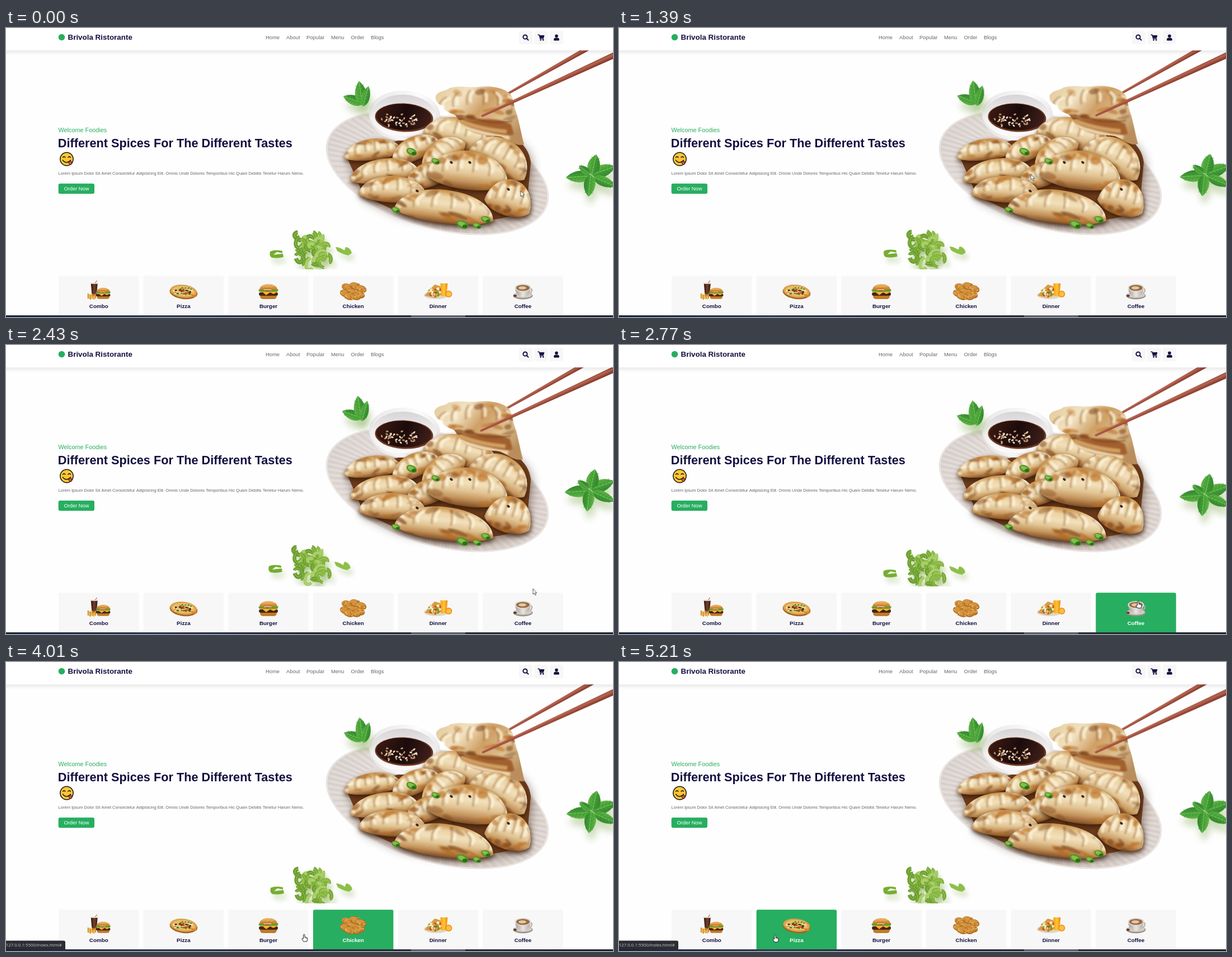
These frames come from a looping animation (1085 px wide and 516 px high, 5.28 s). An HTML page with a canvas:

```html
<!DOCTYPE html>
<html lang="en">
<head>
<meta charset="utf-8">
<title>Restaurant landing page</title>
<style>
  html, body { margin: 0; width: 100%; height: 100%; overflow: hidden; background: #fff; }
  canvas { display: block; }
</style>
</head>
<body>
<canvas id="stage" width="1085" height="516"></canvas>
<script>
const W = 1085, H = 516, PAD = 20, LOOP = 5280;
const NAVY = '#130f40', GREEN = '#27ae60', GREY = '#666', PANEL = '#f7f7f7';
const SANS = '"Liberation Sans", Arial, sans-serif';
const ctx = document.getElementById('stage').getContext('2d');

// ---------- helpers ----------
const clamp = v => Math.max(0, Math.min(1, v));
function randomizer(seed) {
  return () => (seed = (seed * 16807) % 2147483647) / 2147483647;
}
function layer(paint) {
  const c = document.createElement('canvas');
  c.width = W + 2 * PAD;
  c.height = H + 2 * PAD;
  const g = c.getContext('2d');
  g.translate(PAD, PAD);
  paint(g);
  return c;
}
function ellipse(g, x, y, rx, ry, fill, rot = 0) {
  g.beginPath();
  g.ellipse(x, y, rx, ry, rot, 0, 7);
  g.fillStyle = fill;
  g.fill();
}
function box(g, x, y, w, h, r, fill) {
  g.beginPath();
  g.roundRect(x, y, w, h, r);
  g.fillStyle = fill;
  g.fill();
}
function shape(g, d, fill, stroke, width = 1) {
  const p = new Path2D(d);
  if (fill) { g.fillStyle = fill; g.fill(p); }
  if (stroke) { g.strokeStyle = stroke; g.lineWidth = width; g.stroke(p); }
}
function text(g, s, x, y, font, fill, align = 'left') {
  g.font = font + ' ' + SANS;
  g.textAlign = align;
  g.fillStyle = fill;
  g.fillText(s, x, y);
}
function gradient(g, x0, y0, x1, y1, colors) {
  const gr = g.createLinearGradient(x0, y0, x1, y1);
  colors.forEach((c, i) => gr.addColorStop(i / (colors.length - 1), c));
  return gr;
}
function shadowed(g, color, blur, dx, dy, paint) {
  g.save();
  g.shadowColor = color;
  g.shadowBlur = blur;
  g.shadowOffsetX = dx;
  g.shadowOffsetY = dy;
  paint();
  g.restore();
}
function mix(a, b, k) {
  return 'rgb(' + a.map((v, i) => Math.round(v + (b[i] - v) * k)) + ')';
}

// ---------- food ----------
const DOUGH = ['#c58b45', '#ecd2a2', '#f1e0bd', '#e2c594', '#c3925a', '#7d4a22'];

// Soft folds and browned spots, kept inside the given outline.
function toast(g, outline, w, h, seed) {
  const rnd = randomizer(seed * 7919 + 11);
  g.save();
  g.clip(outline);
  g.filter = 'blur(1.6px)';
  g.lineCap = 'round';
  for (let x = -.4; x < .44; x += .15) {
    const top = -h * .4 + x * x * h * 1.4, lean = x * w * .35 + rnd() * 8 - 4;
    shape(g, `M${x * w} ${top}q${lean} ${h * .15} ${lean * .7} ${h * .42}`, null, 'rgba(136,80,32,.4)', 3);
    shape(g, `M${x * w + 6} ${top + 2}q${lean} ${h * .12} ${lean * .6} ${h * .3}`, null, 'rgba(255,246,222,.7)', 5);
  }
  for (let i = 0; i < 16; i++) {
    const x = (rnd() - .5) * w, low = rnd() > .45;
    const y = low ? h * (.2 + rnd() * .28) : -h * .42 + x * x / (w * w) * h * 1.8 + rnd() * h * .12;
    const tone = rnd() > .35 ? '186,108,30' : '118,58,14';
    ellipse(g, x, y, w * (.04 + rnd() * .07), h * (.04 + rnd() * .06), `rgba(${tone},${.3 + rnd() * .35})`, rnd() - .5);
  }
  g.restore();
}
function dumpling(g, x, y, w, h, rot, seed) {
  const a = w / 2, b = h / 2;
  const outline = new Path2D(`M${-a} ${b * .5}C${-a} ${-b * .2} ${-a * .6} ${-b} 0 ${-b}` +
    `C${a * .7} ${-b} ${a} ${-b * .1} ${a} ${b * .5}C${a * .6} ${b * 1.15} ${-a * .6} ${b * 1.15} ${-a} ${b * .5}Z`);
  g.save();
  g.translate(x, y);
  g.rotate(rot);
  shadowed(g, 'rgba(52,24,6,.85)', 9, 1, 4, () => {
    g.fillStyle = gradient(g, 0, -b, 0, b, DOUGH);
    g.fill(outline);
  });
  toast(g, outline, w, h, seed);
  g.restore();
}
function scallion(g, x, y, size) {
  ellipse(g, x, y, size, size * .62, '#4f9626', .4);
  ellipse(g, x - 1, y - 1, size * .65, size * .35, '#86bd4c', .4);
  ellipse(g, x + size * .4, y + size * .3, size * .4, size * .3, '#2f6d17');
}
function bowl(g) {
  const rnd = randomizer(29);
  shape(g, 'M649 156C652 184 678 201 708 201C748 201 774 181 776 157Z', gradient(g, 649, 0, 776, 0, ['#e6e2e2', '#fbfafa', '#c9c0bf']));
  ellipse(g, 712.5, 154, 63.5, 42, gradient(g, 660, 115, 760, 195, ['#e9e7e9', '#fcfcfd', '#e6e1e1']), .06);
  ellipse(g, 712, 156, 57, 37, gradient(g, 0, 118, 0, 193, ['#d6d3d6', '#f1efef', '#fcfbfa']), .06);
  ellipse(g, 711.5, 160, 52, 25.5, '#6c3a22', .05);
  ellipse(g, 711, 159, 49.5, 23.5, gradient(g, 665, 140, 755, 180, ['#3c1a12', '#1b0b0b', '#41201a']), .05);
  for (let i = 0; i < 38; i++) {
    const a = rnd() * 6.28, r = Math.sqrt(rnd());
    ellipse(g, 703 + Math.cos(a) * r * 34, 164 + Math.sin(a) * r * 13, 2.5, 1.5, rnd() > .4 ? '#ead9c2' : '#b78f69', rnd() * 3);
  }
}
function plate(g) {
  const cx = 771, cy = 258, tilt = .28;
  ellipse(g, cx, cy, 205, 100, gradient(g, 600, 160, 900, 370, ['#d9d2ce', '#e9e2de', '#cfc4be', '#ddd4cf']), tilt);
  g.save();
  g.translate(cx, cy);
  g.rotate(tilt);
  g.lineWidth = 1;
  for (let i = 0; i < 130; i++) {
    const a = i * Math.PI / 65;
    g.beginPath();
    g.moveTo(Math.cos(a) * 150, Math.sin(a) * 70);
    g.lineTo(Math.cos(a) * 201, Math.sin(a) * 97);
    g.strokeStyle = i % 2 ? 'rgba(255,255,255,.4)' : 'rgba(150,132,126,.2)';
    g.stroke();
  }
  g.beginPath();
  g.ellipse(0, 0, 203.5, 98.5, 0, 0, 7);
  g.strokeStyle = '#ece7e4';
  g.lineWidth = 2;
  g.stroke();
  g.restore();

  shadowed(g, 'rgba(80,55,40,.6)', 18, 2, 6, () =>
    shape(g, 'M610 232C650 202 720 210 760 172L870 165C900 190 935 205 938 240L930 325C880 350 800 352 700 328L640 300Z', '#6b3b1b'));
  bowl(g);
  const pile = [
    [815, 190, 136, 58, .25], [655, 217, 104, 38, -.12], [885, 230, 112, 66, .5],
    [730, 215, 92, 42, -.42], [778, 230, 96, 56, -.8], [676, 255, 124, 44, -.12],
    [755, 262, 90, 44, -.35], [826, 254, 146, 70, .12], [692, 288, 122, 48, .05],
    [900, 303, 84, 66, .3], [784, 319, 178, 60, .12]
  ];
  pile.forEach((p, i) => dumpling(g, ...p, i + 1));
  [[725, 221, 10], [768, 238, 8], [697, 325, 8], [816, 351, 11], [842, 353, 8], [858, 342, 9]].forEach(s => scallion(g, ...s));
  [[829, 240], [796, 240], [800, 287], [735, 291], [898, 288]].forEach(([x, y]) => ellipse(g, x, y, 3, 2, '#3d2411', .6));
}

// ---------- floating garnish ----------
function leaf(g, x0, y0, x1, y1, width) {
  const len = Math.hypot(x1 - x0, y1 - y0);
  g.save();
  g.translate(x0, y0);
  g.rotate(Math.atan2(y1 - y0, x1 - x0));
  shape(g, `M0 0C${len * .2} ${-width} ${len * .7} ${-width * .8} ${len} 0C${len * .7} ${width * .8} ${len * .2} ${width} 0 0Z`,
    gradient(g, 0, -width, 0, width, ['#6dbd4c', '#46a238', '#2a7d29']));
  shape(g, `M0 0L${len} 0`, null, '#92cf70', .8);
  for (let i = 1; i < 6; i++) {
    const x = len * i / 7;
    shape(g, `M${x + 5} ${-width * .5}L${x} 0L${x + 5} ${width * .5}`, null, 'rgba(28,96,30,.4)', .7);
  }
  g.restore();
}
function leaves(g) {
  const clusters = [
    [[639, 135, 603, 122, 13], [637, 137, 631, 95, 15], [638, 140, 648, 104, 11]],
    [[1047, 262, 1089, 247, 16], [1047, 262, 1055, 226, 16], [1046, 264, 1001, 267, 15],
     [1050, 266, 1090, 283, 13], [1045, 262, 1041, 301, 15], [1044, 261, 1024, 246, 9]]
  ];
  for (const cluster of clusters) {
    shadowed(g, 'rgba(130,170,80,.36)', 13, 3, 14, () => cluster.forEach(l => leaf(g, ...l)));
    cluster.forEach(l => leaf(g, ...l));
  }
}
function slices(g) {
  const rnd = randomizer(73);
  const tones = ['#6b9e2c', '#86b63e', '#a3cb62', '#77ab33'];
  const curl = (x, y, r, from, span, width, tone) => {
    g.lineWidth = width;
    g.beginPath();
    g.ellipse(x, y, r, r * .65, from * .4, from, from + span);
    g.strokeStyle = tone;
    g.stroke();
    g.lineWidth = 1;
    g.strokeStyle = 'rgba(214,234,164,.5)';
    g.stroke();
  };
  shadowed(g, 'rgba(140,175,85,.3)', 9, 5, 10, () => {
    g.lineCap = 'butt';
    for (let i = 0; i < 40; i++) {
      const v = i / 40, y = 372 + v * 51;
      const x = 541 + v * 11 + (rnd() - .5) * (32 + v * 36);
      curl(x, y, 6 + rnd() * 6, rnd() * 6.28, 2 + rnd() * 2.2, 5 + rnd() * 3, tones[i % 4]);
    }
    shape(g, 'M472 399Q470 407 475 410Q486 412 496 409L495 403Q484 404 478 405L484 400Q490 401 494 402L494 398Q480 395 472 399Z', '#75ad31');
    shape(g, 'M589 391L592 398Q599 403 612 406L618 402Q616 392 607 391L605 397Q596 391 589 391Z', '#8dbf49');
  });
}
function chopstick(g, x0, y0, x1, y1, tip, end) {
  const a = Math.atan2(y1 - y0, x1 - x0), len = Math.hypot(x1 - x0, y1 - y0);
  g.save();
  g.translate(x0, y0);
  g.rotate(a);
  shape(g, `M0 ${-tip}L${len} ${-end}V${end}L0 ${tip}Q-3 0 0 ${-tip}Z`, gradient(g, 0, -end, 0, end, ['#88402f', '#b96652', '#9a4938', '#6e2d22']));
  g.restore();
}
function heldDumpling(g) {
  const body = 'M768 122C773 111 785 114 793 107C812 102 832 107 846 105C866 102 893 107 902 119C909 129 907 140 914 157C919 176 922 193 926 208C911 212 901 201 885 194C862 190 838 194 819 177C809 170 808 160 803 156C792 151 780 146 782 139C773 138 767 130 768 122Z';
  shape(g, body, gradient(g, 780, 105, 900, 205, ['#e6cd9f', '#f2e2c2', '#cfa066', '#dfc294', '#b98e5c']));
  g.save();
  g.clip(new Path2D(body));
  g.filter = 'blur(1.5px)';
  shape(g, 'M803 156C830 174 862 151 903 172L908 190C880 200 838 200 803 156Z', '#a3602f');
  shape(g, 'M812 166Q848 181 895 185', null, '#d0a062', 7);
  shape(g, 'M810 174Q850 190 900 196', null, '#ecd3aa', 7);
  shape(g, 'M801 157Q826 156 846 164T905 166', null, 'rgba(110,58,22,.6)', 2.5);
  g.translate(843, 134);
  toast(g, new Path2D('M-75 -30H72V30H-75Z'), 140, 58, 14);
  g.restore();
}
function floating(g) {
  leaves(g);
  slices(g);
  chopstick(g, 899, 116, 1069, 20, 2, 4.5);
  heldDumpling(g);
  chopstick(g, 851, 157, 1110, 38, 2, 5.5);
}

// ---------- menu cards ----------
function burger(g, x, y, s) {
  g.save();
  g.translate(x, y);
  g.scale(s, s);
  box(g, -15, 6, 30, 7, [2, 2, 6, 6], '#c07a2a');
  box(g, -17, 1, 34, 6, 3, '#4c2314');
  shape(g, 'M-17 0L17 0L9 4L3 1L-4 6L-10 1Z', '#f2b430');
  box(g, -16, -3, 32, 3, 1, '#c53a22');
  shape(g, 'M-18 -3Q-12 -7 -7 -3T4 -3T18 -4L16 0H-16Z', '#6b9c2e');
  shape(g, 'M-16 -4C-15 -17 15 -17 16 -4Z', gradient(g, 0, -14, 0, -4, ['#efb660', '#c77a26']));
  for (let i = 0; i < 9; i++) ellipse(g, -10 + i * 2.5, -9 - (i % 3), .8, .5, '#fbe6b4');
  g.restore();
}
const meals = {
  Combo(g) {
    shape(g, 'M-14 -14L-2 -14L-4 9H-12Z', gradient(g, -14, 0, -2, 0, ['#2c120c', '#75412b', '#32170f']));
    shape(g, 'M-7 -14L-3 -19', null, '#b22', 1);
    box(g, -15, -15, 14, 2, 1, '#ddd4ca');
    for (let i = 0; i < 7; i++) box(g, -20 + i * 2.2, 4 + (i % 3), 2, 9, .5, i % 2 ? '#eeb548' : '#d48d27');
    burger(g, 8, 4, .75);
  },
  Pizza(g) {
    ellipse(g, 0, 2, 25, 12, '#a5601f', .12);
    ellipse(g, 0, 0, 24, 11.5, '#dda049', .12);
    ellipse(g, 0, 0, 20, 9, '#e6bd66', .12);
    const rnd = randomizer(5);
    for (let i = 0; i < 40; i++) {
      const a = i * 2.4, r = Math.sqrt(rnd());
      ellipse(g, Math.cos(a) * r * 18, Math.sin(a) * r * 7.5, 1.9, 1.2, ['#bd3d21', '#3d3018', '#f7e5b0', '#4f852d'][i % 4]);
    }
    shape(g, 'M10 4L25 8L19 11Z', '#d7822f');
  },
  Burger(g) { burger(g, 0, 1, 1); },
  Chicken(g) {
    const rnd = randomizer(41);
    [[-11, -7], [3, -9], [14, -4], [-14, 4], [-2, 2], [11, 6], [-7, 9], [4, 9]].forEach(([x, y]) => {
      ellipse(g, x, y, 10, 6.5, '#ad6b20', .3);
      ellipse(g, x - .5, y - .8, 9, 5.3, '#d4943d', .3);
      for (let i = 0; i < 11; i++)
        ellipse(g, x + (rnd() - .5) * 15, y + (rnd() - .5) * 9, 1.4, .9, rnd() > .5 ? '#eab560' : '#b06b22');
    });
  },
  Dinner(g) {
    ellipse(g, -3, 7, 22, 7, '#ddd6c8');
    shape(g, 'M-24 8L-13 -5L-6 -12L4 -9L8 6L-5 12Z', '#d89b45');
    const rnd = randomizer(17);
    for (let i = 0; i < 32; i++)
      ellipse(g, -16 + rnd() * 22, -5 + rnd() * 14, 2.6, 1.3, ['#6d9a30', '#f1d28d', '#b7471f', '#fff1d0'][i % 4], rnd() * 3);
    shape(g, 'M4 -14H17L15 9H6Z', gradient(g, 4, 0, 17, 0, ['#f6a00c', '#ffc33c', '#ec8b06']));
    ellipse(g, 19, 5, 6, 6, '#ed8b0c');
    ellipse(g, 19, 5, 4.5, 4.5, '#ffbd45');
  },
  Coffee(g) {
    ellipse(g, 0, 8, 17.5, 6.5, '#989089');
    ellipse(g, 0, 7, 16, 5, '#d2ccc5');
    shape(g, 'M12 -5q8 1 1 9', null, '#b5ada5', 2);
    shape(g, 'M-14 -6C-13 6 -7 10 0 10S13 6 14 -6Z', gradient(g, -14, 0, 14, 0, ['#a49b94', '#e9e5e0', '#b1a8a1']));
    ellipse(g, 0, -6, 14.5, 7, '#dcd7d1');
    ellipse(g, 0, -6, 12, 5.3, '#9a6a45');
    ellipse(g, -1, -6, 7, 2.8, '#e3c9a5');
    ellipse(g, -14, 8, 3, 2, '#68402a');
  }
};
const cards = Object.keys(meals).map((name, i) => ({ name, x: 94 + i * 151.65, w: 143.5 }));
const mealLayer = layer(g => cards.forEach(c => {
  g.save();
  g.translate(c.x + c.w / 2, 470);
  meals[c.name](g);
  g.restore();
}));

// ---------- page ----------
function header(g) {
  g.fillStyle = gradient(g, 0, 40, 0, 49, ['rgba(0,0,0,.075)', 'rgba(0,0,0,0)']);
  g.fillRect(0, 40, W, 9);
  g.fillStyle = '#fff';
  g.fillRect(0, 0, W, 40);
  ellipse(g, 99.5, 16.5, 5.8, 5.8, GREEN);
  text(g, 'Brivola Ristorante', 110.5, 21.3, 'bold 13.4px', NAVY);
  const links = { Home: 464, About: 501, Popular: 537, Menu: 581, Order: 616.5, Blogs: 652 };
  for (const name in links) text(g, name, links[name], 20.2, '9.4px', GREY);
  [917, 944.5, 972].forEach(x => box(g, x, 5, 24, 24, 2.5, PANEL));
  g.lineCap = 'round';
  shape(g, 'M931.6 16a3.6 3.6 0 1 1 -7.2 0a3.6 3.6 0 1 1 7.2 0M931 19L933.6 21.6', null, NAVY, 2);
  shape(g, 'M951 12.3H953L955 19.4H961', null, NAVY, 1.4);
  shape(g, 'M953.2 13H962.5L961 18.2H954.7Z', NAVY);
  ellipse(g, 955.7, 21.5, 1.3, 1.3, NAVY);
  ellipse(g, 960.2, 21.5, 1.3, 1.3, NAVY);
  ellipse(g, 984, 14.2, 2.8, 2.8, NAVY);
  box(g, 979.2, 17.6, 9.6, 5, [3, 3, 1, 1], NAVY);
}
function emoji(g) {
  ellipse(g, 108.5, 234, 12.4, 12.4, '#111');
  ellipse(g, 108.5, 234, 10.9, 10.9, '#fcc636');
  g.lineCap = 'round';
  shape(g, 'M101.5 231q2.2 -2.5 4.4 0M111 231q2.2 -2.5 4.4 0M101.5 236q6 8 14 0', null, '#111', 1.4);
  shape(g, 'M111.5 239.5l4 -2.5q4 3 2 6q-4 2.6 -6 -3.5Z', '#e84a35', '#111', 1);
}
function intro(g) {
  text(g, 'Welcome Foodies', 93.5, 185.6, '10.85px', GREEN);
  text(g, 'Different Spices For The Different Tastes', 92.8, 213, 'bold 21.7px', NAVY);
  emoji(g);
  text(g, 'Lorem Ipsum Dolor Sit Amet Consectetur Adipisicing Elit. Omnis Unde Dolores Temporibus Hic Quam Debitis Tenetur Harum Nemo.', 93.6, 262.2, '7.53px', GREY);
  box(g, 93.7, 277.8, 64.3, 18.2, 3, GREEN);
  text(g, 'Order Now', 126, 290.2, '9.3px', '#fff', 'center');
}
function taskbar(g) {
  g.fillStyle = gradient(g, 0, 0, W, 0, ['#17243a', '#2c3854', '#1d2738', '#262c3a', '#1e2430']);
  g.fillRect(0, 513, W, 3);
  g.fillStyle = '#596170';
  g.fillRect(724, 513, 97, 3);
}
const backdrop = layer(g => {
  g.fillStyle = '#fefefe';
  g.fillRect(0, 0, W, H);
  intro(g);
  plate(g);
});
const garnish = layer(floating);
const chrome = layer(g => { header(g); taskbar(g); });

// ---------- motion ----------
const cursorPath = [
  [0, 920, 291], [690, 937, 166], [1390, 736, 261], [2430, 942, 435], [2560, 936, 443],
  [2850, 925, 462], [3050, 851, 471], [3080, 843, 472], [3150, 780, 472], [3260, 746, 472],
  [3460, 735, 482], [3700, 700, 487], [3720, 692, 487], [4010, 533, 486], [4500, 425, 488],
  [4640, 397, 489], [4670, 388, 489], [5070, 296, 489], [5140, 286, 488], [5210, 279, 487]
];
const driftPath = [
  [0, 0, 0], [690, 2, -1], [1390, 1.6, -1], [1800, 0, -2.2], [2430, -2.2, -4], [2500, -2.2, -4], [2740, 1, 4.2]
];
const hovers = {
  Coffee: [2560, 3050], Dinner: [3080, 3700], Chicken: [3720, 4010], Burger: [4010, 4640], Pizza: [4670, 6000]
};
const FADE = 200, STATUS_START = 3500;

function along(path, t) {
  const i = path.findIndex(p => p[0] > t);
  if (i < 0) return path[path.length - 1].slice(1);
  const [t0, x0, y0] = path[i - 1], [t1, x1, y1] = path[i];
  const k = (t - t0) / (t1 - t0);
  return [x0 + (x1 - x0) * k, y0 + (y1 - y0) * k];
}
function hoverAmount(name, t) {
  const span = hovers[name];
  return span ? Math.min(clamp((t - span[0]) / FADE), 1 - clamp((t - span[1]) / FADE)) : 0;
}
function drawCards(t) {
  for (const { name, x, w } of cards) {
    const k = hoverAmount(name, t);
    box(ctx, x, 442.3, w, 80, 3, mix([247, 247, 247], [39, 174, 96], k));
    text(ctx, name, x + w / 2, 500.4, 'bold 9.85px', mix([19, 15, 64], [255, 255, 255], k), 'center');
  }
  ctx.drawImage(mealLayer, -PAD, -PAD);
}
function drawStatus() {
  box(ctx, -4, 497.5, 110, 18, [0, 3, 0, 0], '#2b2d33');
  ctx.font = '7.85px "Open Sans", "Noto Sans", sans-serif';
  ctx.textAlign = 'left';
  ctx.fillStyle = '#c6c9ce';
  ctx.fillText('127.0.0.1:5500/index.html#', -.3, 508.3);
}
function drawCursor(x, y) {
  const link = y > 442 && cards.some(c => x >= c.x && x <= c.x + c.w);
  ctx.save();
  ctx.translate(x, y);
  ctx.lineJoin = 'round';
  if (link) {
    shape(ctx, 'M-1.2 1Q0 -1 1.2 1V5L5 6Q6.5 6.5 6 9L5 13H-1L-4 8.5Q-4 6.5 -1.2 8Z', '#fff', '#222', 1);
    shape(ctx, 'M1.2 5V7.5M3 5.6V8M4.7 6V8.3', null, '#555', .6);
  } else {
    shape(ctx, 'M0 0V10L2.3 8L4 11.7L5.6 11L4 7.3H6.8Z', '#fff', '#333', .8);
  }
  ctx.restore();
}
function draw(now) {
  const t = now % LOOP;
  const [dx, dy] = along(driftPath, t);
  ctx.drawImage(backdrop, -PAD, -PAD);
  ctx.save();
  ctx.beginPath();
  ctx.rect(0, 40, W, 391);
  ctx.clip();
  ctx.drawImage(garnish, dx - PAD, dy - PAD);
  ctx.restore();
  drawCards(t);
  if (t >= STATUS_START) drawStatus();
  ctx.drawImage(chrome, -PAD, -PAD);
  drawCursor(...along(cursorPath, t));
}
const start = performance.now();
function tick() {
  draw(performance.now() - start);
  requestAnimationFrame(tick);
}
tick();
</script>
</body>
</html>
```
